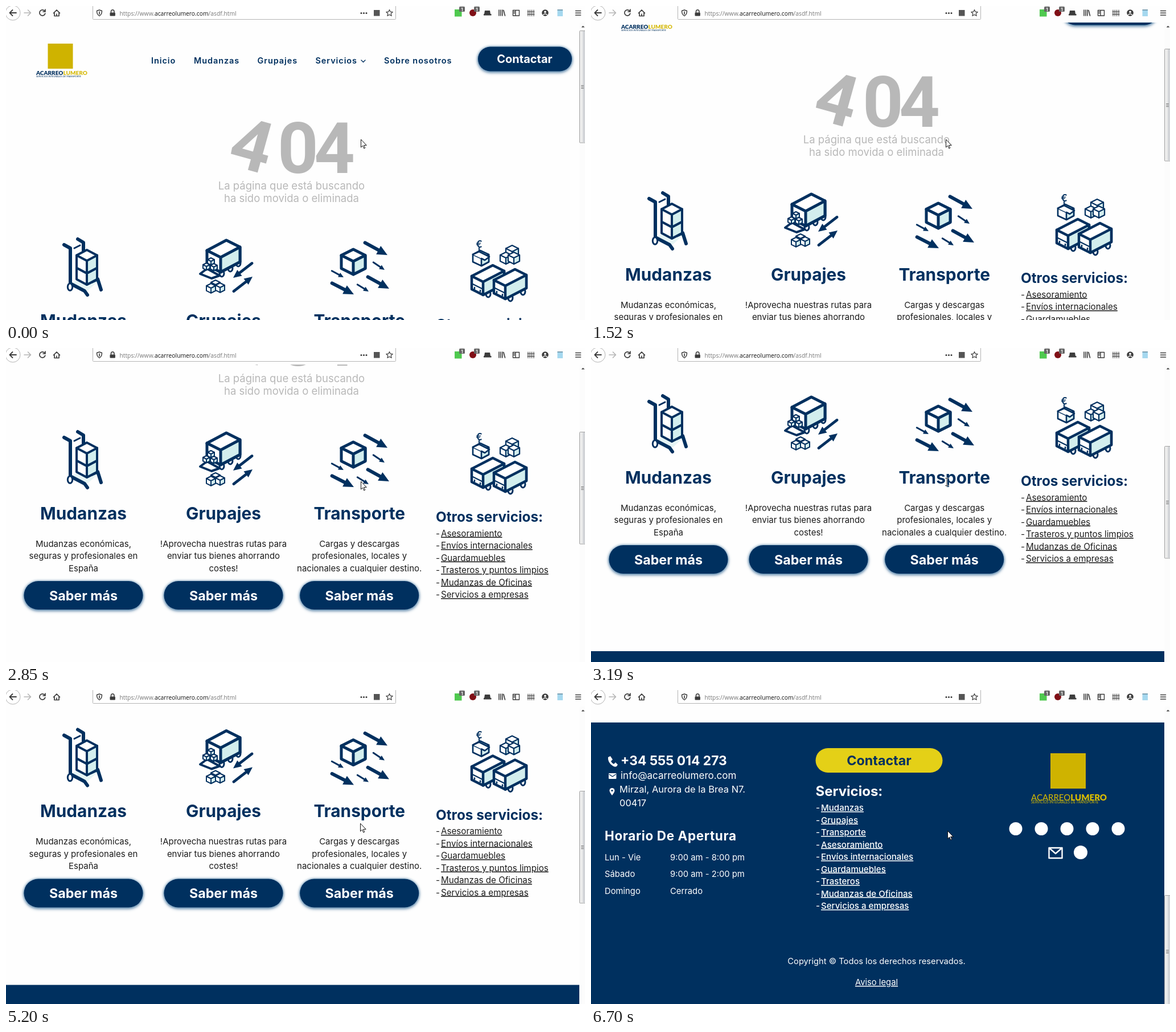
These frames come from a looping animation (1017 by 551 pixels, 7.87 s). An HTML page:

```html
<!DOCTYPE html>
<html lang="es">
<head>
<meta charset="utf-8">
<title>Página 404</title>
<style>
html, body { margin: 0; width: 100%; height: 100%; overflow: hidden; background: #fefefe; }
svg { display: block; width: 1017px; height: 551px; }
text { font-family: Inter, sans-serif; white-space: pre; }
.u { text-decoration: underline; }
.logo { font-family: Lato, sans-serif; }
.url { font-family: "Open Sans", sans-serif; }
.num { font-family: Roboto, sans-serif; }
.glow { filter: drop-shadow(0 0 2px #6e9ab9) drop-shadow(0 2px 2px #6c8fb0); }
</style>
</head>
<body>
<svg id="stage" viewBox="0 0 1017 551"></svg>
<script>
const NAVY = '#00305f', PALE = '#d3eeee', GREY = '#b8b8b8', INK = '#1c1c1c', GOLD = '#cfb300';

const text = (x, y, str, size, weight = 400, fill = INK, anchor = 'start', more = '') =>
  `<text x="${x}" y="${y}" font-size="${size}" font-weight="${weight}" fill="${fill}" text-anchor="${anchor}" ${more}>${str}</text>`;
const rect = (x, y, w, h, fill, more = '') =>
  `<rect x="${x}" y="${y}" width="${w}" height="${h}" fill="${fill}" ${more}/>`;
const line = (d, width, color = NAVY, fill = 'none') =>
  `<path d="${d}" fill="${fill}" stroke="${color}" stroke-width="${width}" stroke-linecap="round" stroke-linejoin="round"/>`;
const shape = (d, fill) => `<path d="${d}" fill="${fill}"/>`;
const disc = (x, y, r, fill) => `<circle cx="${x}" cy="${y}" r="${r}" fill="${fill}"/>`;
const wheel = (x, y, r = 4) =>
  `<ellipse cx="${x}" cy="${y}" rx="${r}" ry="${r * 1.5}" fill="#fff" stroke="${NAVY}" stroke-width="3"/>`;
const pill = (x, y, w, h) => rect(x, y, w, h, NAVY, `rx="${h / 2}" class="glow"`);

// Isometric block: (x,y) is the near top corner, (a,b) and (c,d) its top edges
const block = (x, y, a, b, c, d, h, sw) =>
  line(`M${x + a} ${y + b}l${c} ${d}L${x + c} ${y + d}v${h}L${x} ${y + h}l${a} ${b}z`, sw, NAVY, '#fff') +
  shape(`M${x} ${y}l${c} ${d}v${h}l${-c} ${-d}z`, PALE) +
  line(`M${x + a} ${y + b}L${x} ${y}l${c} ${d}v${h}L${x} ${y + h}V${y}`, sw);
const cube = (x, y, w, sw) => block(x, y, -w, -w / 2, w, -w / 2, w * 1.08, sw);

function arrow(x1, y1, x2, y2, w) {
  const len = Math.hypot(x2 - x1, y2 - y1), deg = Math.atan2(y2 - y1, x2 - x1) * 180 / Math.PI;
  return `<g transform="translate(${x2} ${y2}) rotate(${deg})">` +
    line(`M${-len + w / 2} 0H${-w * 2}`, w) + shape(`M0 0L${-w * 3} ${-w * 1.4}V${w * 1.4}z`, NAVY) + '</g>';
}

const trolley = () =>
  line('M113 487l34-16 18 9-22 20z', 0, 'none', '#e6f5f5') +
  line('M102 419l11 6v62l25 13 5 7M126 409l10 6v16M150 484l11-5 6 19', 6) +
  line('M120 425l10-5', 3) + wheel(112.5, 493, 4.2) +
  block(142, 469, -18, -9.5, 18, -9.5, 20, 4) + block(142, 447, -18, -9.5, 18, -9.5, 22, 4);

const lorry = () =>
  wheel(379, 469) + wheel(394, 460) + wheel(408, 451) +
  block(377, 441, -24, -12, 34, -18, 26, 5) +
  line('M341 470l12-9 22 12-14 5z', 4, NAVY, '#fff') +
  cube(360, 448, 6, 2) + cube(352, 457, 6, 2) + cube(365, 458, 6, 2) +
  cube(368, 489, 8, 2) + cube(360, 495, 8, 2) + cube(376, 494, 8, 2) +
  arrow(434, 450, 399, 477, 4.8) + arrow(398, 502, 433, 475, 4.8);

const parcel = () =>
  block(610, 448, -21, -10.5, 21, -10.5, 23, 5) +
  arrow(628, 414, 670, 437, 6) + arrow(633, 474, 673, 496, 6) + arrow(570, 485, 611, 506, 6) +
  arrow(644, 449, 665, 463, 3) + arrow(571, 464, 593, 476, 3) + arrow(616, 488, 637, 501, 3);

const bus = (x, y) =>
  wheel(x + 9, y + 21) + wheel(x + 31, y + 10) +
  block(x, y, -20, -10, 37, -19, 23, 4.5) +
  line(`M${x - 18} ${y + 4}l16 8`, 2) + line(`M${x - 15} ${y + 10}v2M${x - 5} ${y + 15}v2`, 2.5);

const fleet = () =>
  text(831, 424, '€', 17, 600, NAVY, 'middle') + line('M831 424v11', 2) +
  block(835, 443, -15, -7, 13, -7, 13, 2.6) + line('M820 436l11-5 18 9-8 6-6-3', 2.6, NAVY, '#fff') +
  cube(889, 431, 11, 2.2) + cube(878, 442, 10, 2.2) + cube(892, 442, 10, 2.2) +
  bus(838, 484) + bus(877, 491);

const links = (x, y, names, size, weight, fill) => names.map((name, i) =>
  text(x, y + i * 21.5, '-', size, weight, fill) +
  text(x + 9, y + i * 21.5, name, size, weight, fill, 'start', 'class="u"')).join('');

const brand = (x, y, size, w1, c1, c2) =>
  text(x, y, `ACARREO<tspan font-weight="900" fill="${c2}">LUMERO</tspan>`, size, w1, c1, 'start', 'class="logo"') +
  text(x, y + size * .36, 'SERVICIOS INTEGRALES DE TRANSPORTE', size * .44, 400, c1, 'start', 'class="logo" font-style="italic"');

const digit = (x, y, d) => text(x, y, d, 125, 700, GREY, 'middle', 'class="num"');

function header() {
  const nav = [[255, 'Inicio'], [330, 'Mudanzas'], [441.5, 'Grupajes'], [543.5, 'Servicios'], [664, 'Sobre nosotros']];
  return rect(73.5, 66, 44, 44, GOLD) + brand(53, 121, 10, 900, NAVY, '#d6bb10') +
    nav.map(([x, s]) => text(x, 101, s, 14.5, 600, NAVY, 'start', 'letter-spacing=".9"')).join('') +
    line('M624 95l3.5 3.5 3.5-3.5', 1.4) +
    pill(829, 71.5, 165, 43) + text(911, 100, 'Contactar', 20, 700, '#fff', 'middle') +
    `<g transform="translate(432 244) rotate(15.5)">${digit(0, 44, 4)}</g>` +
    digit(512.8, 292.5, 0) + digit(577, 292.5, 4) +
    text(501.5, 322, 'La página que está buscando', 18.5, 400, GREY, 'middle') +
    text(501.5, 343.5, 'ha sido movida o eliminada', 18.5, 400, GREY, 'middle');
}

function services() {
  const cards = [
    [136, 'Mudanzas', 'Mudanzas económicas,', 'seguras y profesionales en', 'España'],
    [382, 'Grupajes', '!Aprovecha nuestras rutas para', 'enviar tus bienes ahorrando', 'costes!'],
    [620.7, 'Transporte', 'Cargas y descargas', 'profesionales, locales y', 'nacionales a cualquier destino.']];
  return trolley() + lorry() + parcel() + fleet() +
    cards.map(([x, title, ...lines]) =>
      text(x, 562.5, title, 29.8, 700, NAVY, 'middle') +
      lines.map((s, i) => text(x, 610.5 + i * 21.5, s, 15, 400, INK, 'middle')).join('') +
      pill(x - 104.5, 671, 209, 50) + text(x, 704.5, 'Saber más', 23.3, 700, '#fff', 'middle')).join('') +
    text(755, 567, 'Otros servicios:', 24.3, 700, NAVY) +
    links(755, 592.5, ['Asesoramiento', 'Envíos internacionales', 'Guardamuebles',
      'Trasteros y puntos limpios', 'Mudanzas de Oficinas', 'Servicios a empresas'], 15.2, 400, INK);
}

function footer() {
  const W = '#fff';
  const hours = [['Lun - Vie', '9:00 am - 8:00 pm'], ['Sábado', '9:00 am - 2:00 pm'], ['Domingo', 'Cerrado']];
  return rect(0, 857, 1007, 520, NAVY) +
    shape('M30 918l4-2 4 6-3 3q2 4 5 5l3-3 4 4-2 3q-3 2-7-1-9-6-8-15z', W) +
    rect(31, 946, 13.5, 10, W, 'rx="1"') + line('M32 948l5.7 4 5.7-4', 1.2, NAVY) +
    shape('M37 985q-4.500-6-4.500-8.500a4.500 4.500 0 0 1 9 0q0 2.500-4.500 8.500z', W) + disc(37, 976.5, 1.6, NAVY) +
    text(52, 932, '+34 555 014 273', 22.8, 700, W) +
    text(52, 956, 'info@acarreolumero.com', 17, 400, W) +
    text(50, 980, 'Mirzal, Aurora de la Brea N7.', 16.5, 400, W) + text(50, 1004, '00417', 16.5, 400, W) +
    text(24, 1064, 'Horario De Apertura', 22.5, 700, W, 'start', 'letter-spacing=".6"') +
    hours.map(([day, time], i) => text(24, 1098.5 + i * 29.5, day, 14.8, 400, W) +
      text(139, 1098.5 + i * 29.5, time, 14.8, 400, W)).join('') +
    rect(394.5, 902, 223, 43, '#e4d017', 'rx="21.5"') + text(506, 932, 'Contactar', 23.3, 700, NAVY, 'middle') +
    text(394.5, 986, 'Servicios:', 24, 700, W) +
    links(395, 1012, ['Mudanzas', 'Grupajes', 'Transporte', 'Asesoramiento', 'Envíos internacionales',
      'Guardamuebles', 'Trasteros', 'Mudanzas de Oficinas', 'Servicios a empresas'], 15.1, 500, W) +
    rect(807, 911, 62, 62, GOLD) + brand(773, 994, 15, 400, '#d8bb00', '#d8bb00') +
    [746, 791, 836, 881, 926].map(x => disc(x, 1043.5, 11.5, W)).join('') + disc(860, 1085, 12, W) +
    line('M804.500 1077h23v18h-23zl11.500 10 11.500-10', 2.4, W) +
    text(501.5, 1281, 'Copyright © Todos los derechos reservados.', 14.7, 400, W, 'middle') +
    text(501.5, 1318, 'Aviso legal', 14.8, 400, W, 'middle', 'class="u"');
}

function toolbar() {
  const K = '#3c3c3c';
  const badge = x => rect(x - 5, 1, 10, 9, '#666', 'rx="1.5"') + text(x, 8.5, '1', 8, 600, '#fff', 'middle');
  return rect(0, 0, 1017, 29, '#fefefe') +
    `<circle cx="12" cy="12" r="13" fill="#fff" stroke="#b4b4b4"/>` +
    line('M18 12H6.500M11.500 7l-5 5 5 5', 1.8, K) + line('M32 12h11.500M38.500 7l5 5-5 5', 1.6, '#b5b5b5') +
    line('M68.300 9.500a5 5 0 1 0 .500 3.500M69 6v4h-4', 1.7, K) +
    line('M83.500 12.500l5.500-5.500 5.500 5.500M85 12v5.500h8V12M89 17v-3', 1.7, K) +
    rect(152.5, -.5, 532, 24, '#fff', 'stroke="#b4b4b4" rx="1"') +
    line('M164 7l4.500 1.500q0 6.500-4.500 9-4.500-2.500-4.500-9z', 1.4, K) + line('M164 10v4.500', 1.6, K) +
    line('M184.500 11.500v-2a2.700 2.700 0 0 1 5.400 0v2', 1.6, K) + rect(182.500, 11.500, 9.4, 6, K, 'rx="1"') +
    text(199.5, 17, 'https://www.<tspan fill="#111">acarreolumero.com</tspan>/asdf.html', 10.3, 400, '#777', 'start', 'class="url"') +
    [624, 628.5, 633].map(x => disc(x, 12.5, 1.5, K)).join('') + rect(646, 7, 10.5, 10.5, '#555') +
    line('M673.500 6.500l1.700 3.700 4 .4-3 2.700.9 4-3.600-2.100-3.600 2.100.9-4-3-2.700 4-.4z', 1.2, K) +
    rect(788, 6, 12.5, 12.5, '#4fc94f') + badge(801) + disc(820, 12, 6, '#800f16') + badge(827) +
    shape('M841 8h9l1 6h1.500v2.500h-13.500V14h1z', K) +
    line('M866 7v10M869 7v10M872 7v10M874 7.500l2.500 9.500', 1.6, K) +
    line('M890.500 7.500h11v9.500h-11zM895 7.500v9.500M892 10h1.500M892 12.500h1.500', 1.4, K) +
    line('M917 7v10.500M920.300 7v10.500M923.600 7v10.500M927 7v10.500M916 10h12M916 14.500h12', 1.1, K) +
    disc(947, 12, 5.8, K) + disc(947, 10.3, 1.9, '#fff') + line('M943.800 15.200q3.200-3 6.400 0', 1.5, '#fff') +
    rect(968.5, 7, 9.5, 11, '#a5d8ef') + rect(968.5, 6, 9.5, 2, '#7ca2b5') +
    line('M1000.500 8.500h9M1000.500 12.300h9M1000.500 16h9', 1.6, K);
}

const scrollbar = () =>
  rect(1007, 29, 10, 522, '#fcfcfc') + line('M1011.500 37l2-2 2 2z', .6, '#333', '#333') +
  `<g id="thumb">${rect(1007.5, 43.5, 12, 196.5, '#ececec', 'stroke="#a3a3a3" rx="1"')}` +
  rect(1013, 44, 4, 195.5, '#d3d5d8') + line('M1010.500 139.500h4M1010.500 142h4M1010.500 144.500h4', 1, '#777') + '</g>';

const pointers =
  `<g id="arrow">${line('M0 0v13.500l3.100-2.900 2.200 4.900 2-.9-2.200-4.700h4.200z', 1, '#111', '#fff')}</g>` +
  `<g id="beam">${line('M622.500 228.500h5M625 228.500v13M622.500 241.500h5', 2.2, '#fff') +
    line('M622.500 228.500h5M625 228.500v13M622.500 241.500h5', 1, '#333')}</g>`;

document.getElementById('stage').innerHTML =
  `<g id="page">${header() + services() + footer()}</g>` + scrollbar() + toolbar() + pointers;

// [time, scroll offset], held until the next entry
const scrolls = [[0, 0], [1110, 6], [1210, 27], [1310, 53], [1420, 72], [1520, 81],
  [1740, 128], [1860, 162], [2370, 206], [2480, 228], [2580, 239], [2670, 243],
  [2850, 262], [2960, 292], [3080, 315], [3190, 325], [4940, 327],
  [5100, 331], [5200, 339.5], [5310, 390], [5410, 450], [5520, 515], [5620, 573], [5770, 648],
  [6580, 725], [6700, 800]];
// [time, pointer, x, y]
const cursors = [[0, 'arrow', 623.5, 234.5], [3080, 'beam'], [4720, ''], [5100, 'arrow', 622.5, 234.5],
  [6370, ''], [6580, 'arrow', 626.5, 247.5]];

const at = (list, t) => list.findLast(k => k[0] <= t);
const el = id => document.getElementById(id);
const start = performance.now();

function draw() {
  const t = (performance.now() - start) % 7870;
  const y = at(scrolls, t)[1], [, kind, cx, cy] = at(cursors, t);
  el('page').setAttribute('transform', `translate(0 ${-y})`);
  el('thumb').setAttribute('transform', `translate(0 ${Math.round(y * .396)})`);
  for (const id of ['arrow', 'beam']) el(id).style.display = id === kind ? '' : 'none';
  if (kind === 'arrow') el('arrow').setAttribute('transform', `translate(${cx} ${cy})`);
  requestAnimationFrame(draw);
}
draw();
</script>
</body>
</html>
```
